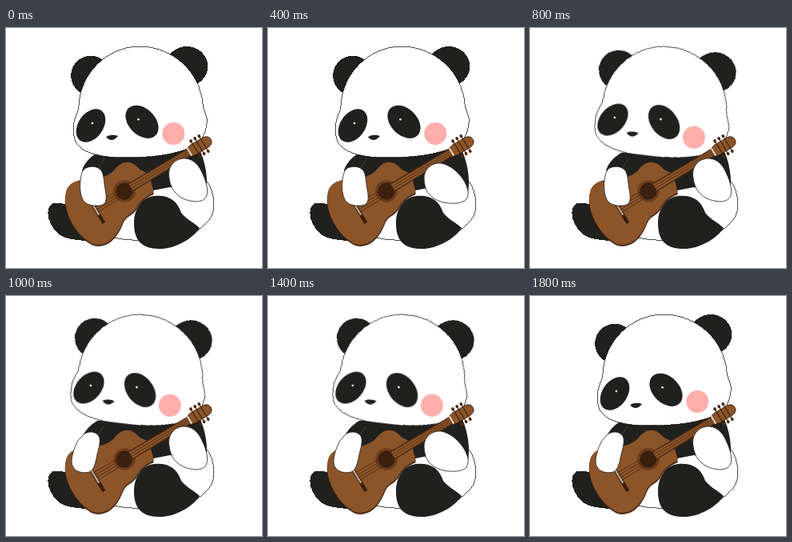
Write an HTML page that moves like this. It is 320x300 px and loops after 2000 ms.

```html
<!DOCTYPE html>
<html lang="en">
<head>
<meta charset="utf-8">
<title>Panda playing guitar</title>
<style>
  html, body { margin: 0; width: 100%; height: 100%; overflow: hidden; background: #fff; }
  svg { display: block; width: 320px; height: 300px; }
  .ink { fill: #20201f; }
  .fur { fill: #fff; stroke: #20201f; stroke-width: .8; }
  .crisp { shape-rendering: crispEdges; }
  #head { transform-origin: 167px 97px; }
</style>
</head>
<body>
<svg viewBox="0 0 320 300">
  <defs>
    <path id="box" d="M75 208C77 196 88 191 103 191C118 190 127 187 134 181C140 174 144 169.500 152 169.500C159 169.500 163 174 168 179C174 181 180 185 181 191C182 198 185 203 184 208C174 212 167 218 162 228C157 235 150 235 146 244C142 255 135 266 126 270C117 274 109 273 103 268C89 260 70 232 75 208Z"/>
  </defs>

  <!-- body -->
  <path class="fur crisp" d="M112 240L185 195L248 188C257 198 260 210 260 222C259.500 236 252 244 241 252C222 263 195 266 165 265.500Q146 265 128 261Z"/>
  <path class="ink crisp" d="M80 222C70 219 62 217 57 220C51 224 51 236 56 245C61 255 68 262 82 264Q94 266 106 266L115 235Z"/>
  <path class="ink" d="M114 156C104 162 98 169 95 178L128 214L184 203L205 199L250 206C253 190 250 167 240 148Z"/>

  <g id="head">
    <circle class="ink crisp" cx="106" cy="59.500" r="24.800"/>
    <ellipse class="ink crisp" cx="226" cy="48" rx="26.300" ry="25"/>
    <path class="fur crisp" d="M91 97C93 55 128 23 167 23C208 23 243 55 246 95C246 101 250 106 251 113C252 127 246 141 235 147.500C213 158.500 180 162 150 162C119 162 95 157 87 142C82 130 84 116 89 106Q91 102 91 97Z"/>
    <ellipse class="ink" cx="106" cy="122" rx="15.500" ry="23" transform="rotate(35 106 122)"/>
    <ellipse class="ink" cx="170" cy="117.300" rx="16.500" ry="24" transform="rotate(-45 170 117.300)"/>
    <circle cx="108" cy="119" r="1.300" fill="#fff"/>
    <circle cx="165.500" cy="114.300" r="1.300" fill="#fff"/>
    <path class="ink" d="M125 136Q132 132 140 135Q136 140 132 140Q128 140 125 136Z"/>
    <circle cx="209.300" cy="132" r="14" fill="#ffadad"/>
  </g>

  <!-- guitar -->
  <use href="#box" fill="#5a3015" stroke="#2b170b" stroke-width=".8"/>
  <use href="#box" fill="#8b5429" transform="translate(-.2 -1.800)"/>
  <g transform="translate(148 204) rotate(-31)">
    <circle r="13.800" fill="#6b3c1c"/>
    <circle r="10.500" fill="#3a1e0d"/>
    <path d="M9 -5.500L95 -4.800V4.800L9 5.500Z" fill="#8b5429" stroke="#3a1e0d" stroke-width=".7"/>
    <path d="M-42.500 -9V21" stroke="#3a1e0d" stroke-width="4.500"/>
    <path d="M-42.500 -9V9" stroke="#b9a391" stroke-width="2.500"/>
    <path id="strings" fill="none" stroke="#4a2812" stroke-width=".7"/>
    <path d="M95 -5.500L100 -7H118Q126 -6.500 126 0T118 7H100L95 5.500Z" fill="#8b5429" stroke="#3a1e0d" stroke-width=".8"/>
    <path d="M95 -5.500V5.500" stroke="#e4d8cc" stroke-width="2"/>
    <path id="pegs" stroke="#3a1e0d" stroke-width="1.100"/>
    <g id="knobs" fill="#4a2812"></g>
  </g>

  <!-- strumming arm: on the strings, then drawn away -->
  <g id="strumIn">
    <path d="M123.500 163L114 177" stroke="#4c544d" stroke-width=".7"/>
    <path class="fur" d="M98 176C104 172 114 172 119 178C123 184 122 193 124.500 204C126 214 125.500 220 119 221.500C112 223 101 222 97 216C93 210 92 200 93 191Q94 180 98 176Z"/>
  </g>
  <g id="strumOut">
    <path d="M122 163L115 173" stroke="#4c544d" stroke-width=".7"/>
    <path class="fur" d="M96 174C102 168 112 169 116 175C119 181 116 190 114 198C112 208 110 218 104 220C97 222 87 220 84 214C80 208 83 198 86 189Q89 180 96 174Z"/>
  </g>

  <!-- fretting hand: high and low on the neck -->
  <path id="fretHigh" class="fur" d="M203.500 184C203 172 212 162.500 224 163C236 164 242 173 246 183C250 191 253 202 251 209C249 216 241 218 233 216.500C221 215 213 209 208 201Q204 193 203.500 184Z"/>
  <path id="fretLow" class="fur" d="M195 188C195 176 205 168 216 169C228 171 239 181 245 191C250 199 252 208 248 214C243 220 230 220 219 218C208 215 200 209 197 200Q195 194 195 188Z"/>

  <path class="ink" d="M185 210C169 212 160 227 160 244C160 264 168 275 190 276C210 277 233 264 242 250C235 243 225 239 219 231C214 215 202 208 185 210Z"/>
</svg>
<script>
  const BEAT = 200;
  const $ = id => document.getElementById(id);

  $('strings').setAttribute('d',
    [-4.5, -1.5, 1.5, 4.5].map(y => `M-42 ${y * 1.2}L95 ${y * .8}`).join(''));

  const pegs = [103.5, 109.5, 115.5];
  $('pegs').setAttribute('d', pegs.map(x => `M${x} -11V11`).join(''));
  $('knobs').innerHTML = pegs.flatMap(x => [-11, 11].map(y =>
    `<ellipse cx="${x}" cy="${y}" rx="1.800" ry="2.200"/>`)).join('');

  // Hold each value for an equal share of the cycle, then jump.
  function hold(id, prop, values, beats) {
    const frames = values.map((v, i) =>
      ({ [prop]: v, offset: i / values.length, easing: 'step-end' }));
    frames.push({ [prop]: values[0], offset: 1 });
    const anim = $(id).animate(frames,
      { duration: beats * values.length * BEAT, iterations: Infinity });
    anim.startTime = document.timeline.currentTime;
  }

  hold('strumIn', 'opacity', [1, 0], 1);
  hold('strumOut', 'opacity', [0, 1], 1);

  // The last two beats repeat the opening pose before the loop restarts.
  hold('fretHigh', 'opacity', [1, 0, 1, 0, 1], 2);
  hold('fretLow', 'opacity', [0, 1, 0, 1, 0], 2);
  const left = 'rotate(0deg)', right = 'rotate(6.8deg)';
  hold('head', 'transform', [left, left, right, right, left], 2);
</script>
</body>
</html>
```
